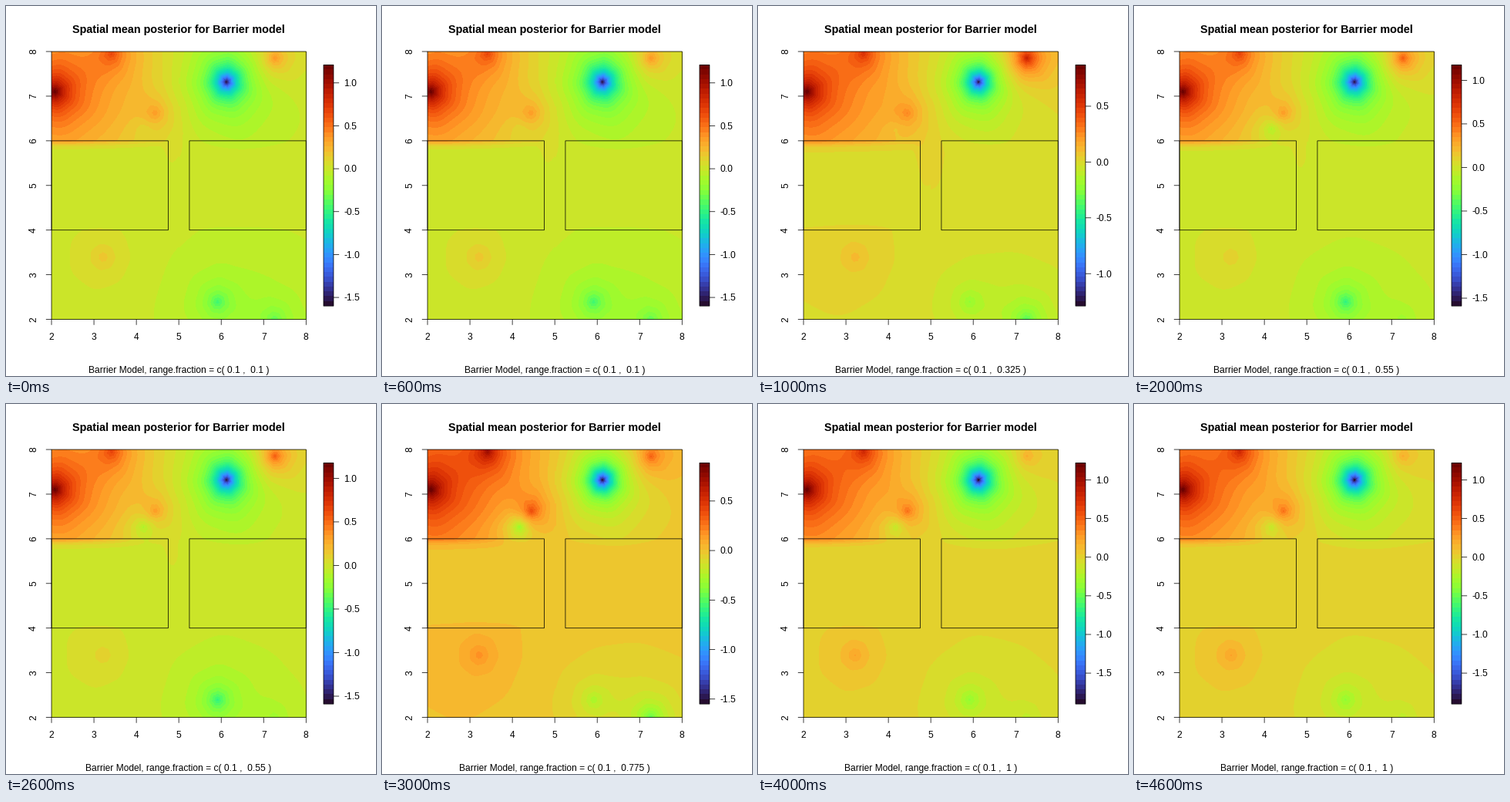
A matplotlib script for the animation above (5000 ms loop, 480x480 px).

```python
import numpy as np
import matplotlib.pyplot as plt
from matplotlib.animation import FuncAnimation
from matplotlib.colors import ListedColormap
from matplotlib.patches import Rectangle

SIZE, DPI, LEVELS, STEPS = 480, 80, 50, 5
PT = 72 / DPI                                  # points per pixel
LEFT, RIGHT, TOP, BOTTOM = 59.04, 389.28, 59.04, 406.56
BAR_LEFT, BAR_RIGHT, BAR_TOP, BAR_BOTTOM = 411.96, 424.92, 76.4, 389.2

plt.rcParams["font.family"] = "Liberation Sans"
plt.rcParams["path.snap"] = False

# Lowest and highest value of the surface, per step
LIMITS = [(-1.6, 1.21), (-1.29, .87), (-1.59, 1.177), (-1.55, .885), (-1.9, 1.22)]

# Small sites: x, y, mean height, swing, phase in degrees, cycles per loop
SITES = [
    (3.42, 7.95, .50, .12, 252, 1),
    (7.25, 7.85, .55, .20, 99, 1),
    (4.45, 6.62, .40, .16, 242, 1),
    (4.17, 6.27, -.33, .27, 46, 1),
    (3.22, 3.40, .18, .065, 288, 1),
    (5.90, 2.40, -.35, .165, 123, 2),
    (7.25, 2.00, -.30, .18, 256, 2),
]


def px(x):
    return LEFT + (x - 2) * (RIGHT - LEFT) / 6


def py(y):
    return BOTTOM - (y - 2) * (BOTTOM - TOP) / 6


cols, rows = round(RIGHT - LEFT), round(BOTTOM - TOP)
X, Y = np.meshgrid(2 + 6 * (np.arange(cols) + .5) / cols,
                   8 - 6 * (np.arange(rows) + .5) / rows)


def shield(depth):
    """Fade quickly inside the walls, slowly along the gap between them."""
    scale = np.where(X < 5, .11, .22) + .6 * np.exp(-((X - 5) / .3) ** 4)
    return np.exp(-(np.maximum(depth, 0) / scale) ** 1.5)


def bump(x, y, near=.3, far=1.1, share=.25):
    """Unit peak with a sharp core and a wide tail, kept to its side of the walls."""
    dx, dy = X - x, Y - y
    d = np.hypot(dx, dy)
    wobble = .02 + .07 * np.exp(-(d / .15) ** 2)
    d = d * (1 + wobble * np.cos(7 * np.arctan2(dy, dx) + 3 * x))
    core = (1 - share) * np.exp(-d / near) + share * np.exp(-d / far)
    return core * shield(6 - Y if y > 5 else Y - 4)


def height(step, mean, swing, phase, cycles):
    return mean + swing * np.cos(2 * np.pi * cycles * step / STEPS - np.radians(phase))


peak = bump(2.08, 7.1, near=.3, far=1.6, share=.5)
trough = bump(6.11, 7.32, near=.22, far=.95, share=.35)
spots = [bump(x, y) for x, y, *_ in SITES]


def field(step):
    lo, hi = LIMITS[step]
    v = hi * peak + 1.06 * lo * trough
    for spot, (_, _, *wave) in zip(spots, SITES):
        v += height(step, *wave) * spot
    return np.clip(np.floor((v - lo) / (hi - lo) * LEVELS), 0, LEVELS - 1)


fields = [field(i) for i in range(STEPS)]
shades = plt.get_cmap("turbo")(np.linspace(0, 1, LEVELS))[:, :3]
cmap = ListedColormap(shades ** 1.15)          # slightly deeper than plain turbo

fig = plt.figure(figsize=(SIZE / DPI, SIZE / DPI), dpi=DPI, facecolor="white")
ax = fig.add_axes([0, 0, 1, 1])
ax.axis("off")


def line(x0, y0, x1, y1):
    return ax.plot([x0, x1], [y0, y1], color="black", lw=.75 * PT,
                   solid_capstyle="butt")[0]


def label(x, y, text, size=12, **kw):
    kw = {"ha": "center", "va": "baseline", **kw}
    return ax.text(x, y, text, fontsize=size * PT, color="black", **kw)


def frame(x0, y0, x1, y1):
    ax.add_patch(Rectangle((x0, y0), x1 - x0, y1 - y0, fill=False,
                           ec="black", lw=.75 * PT, zorder=3))


style = dict(cmap=cmap, vmin=0, vmax=LEVELS - 1, interpolation="nearest", aspect="auto")
image = ax.imshow(fields[0], extent=(LEFT, RIGHT, BOTTOM, TOP), **style)
ax.imshow(np.arange(LEVELS)[::-1, None],
          extent=(BAR_LEFT, BAR_RIGHT, BAR_BOTTOM, BAR_TOP), **style)

frame(LEFT, TOP, RIGHT, BOTTOM)
frame(BAR_LEFT, BAR_TOP, BAR_RIGHT, BAR_BOTTOM)
frame(px(2), py(6), px(4.75), py(4))
frame(px(5.25), py(6), px(8), py(4))

for n in range(2, 9):
    line(px(n), BOTTOM, px(n), BOTTOM + 7.2)
    line(LEFT - 7.2, py(n), LEFT, py(n))
    label(px(n), 433, str(n))
    label(42, py(n), str(n), rotation=90, ha="right", va="center")

label(224, 35, "Spatial mean posterior for Barrier model", 14.4, weight="bold")
caption = label(224, 476, "")

VALUES = np.arange(-1.5, 1.1, .5)
ticks = [line(BAR_RIGHT, 0, BAR_RIGHT + 7.2, 0) for _ in VALUES]
marks = [label(438.5, 0, f"{v:.1f}", ha="left") for v in VALUES]

ax.set_xlim(0, SIZE)
ax.set_ylim(SIZE, 0)


def update(step):
    image.set_data(fields[step])
    caption.set_text(f"Barrier Model, range.fraction = c( 0.1 ,  {.1 + .225 * step:g} )")
    lo, hi = LIMITS[step]
    for v, tick, mark in zip(VALUES, ticks, marks):
        y = BAR_BOTTOM - (v - lo) / (hi - lo) * (BAR_BOTTOM - BAR_TOP)
        tick.set_ydata([y, y])
        mark.set_y(y + 4.3)
        for artist in (tick, mark):
            artist.set_visible(lo <= v <= hi)
    return [image, caption, *ticks, *marks]


anim = FuncAnimation(fig, update, frames=STEPS, interval=1000, repeat=True,
                     repeat_delay=0, blit=False)
plt.show()
```
